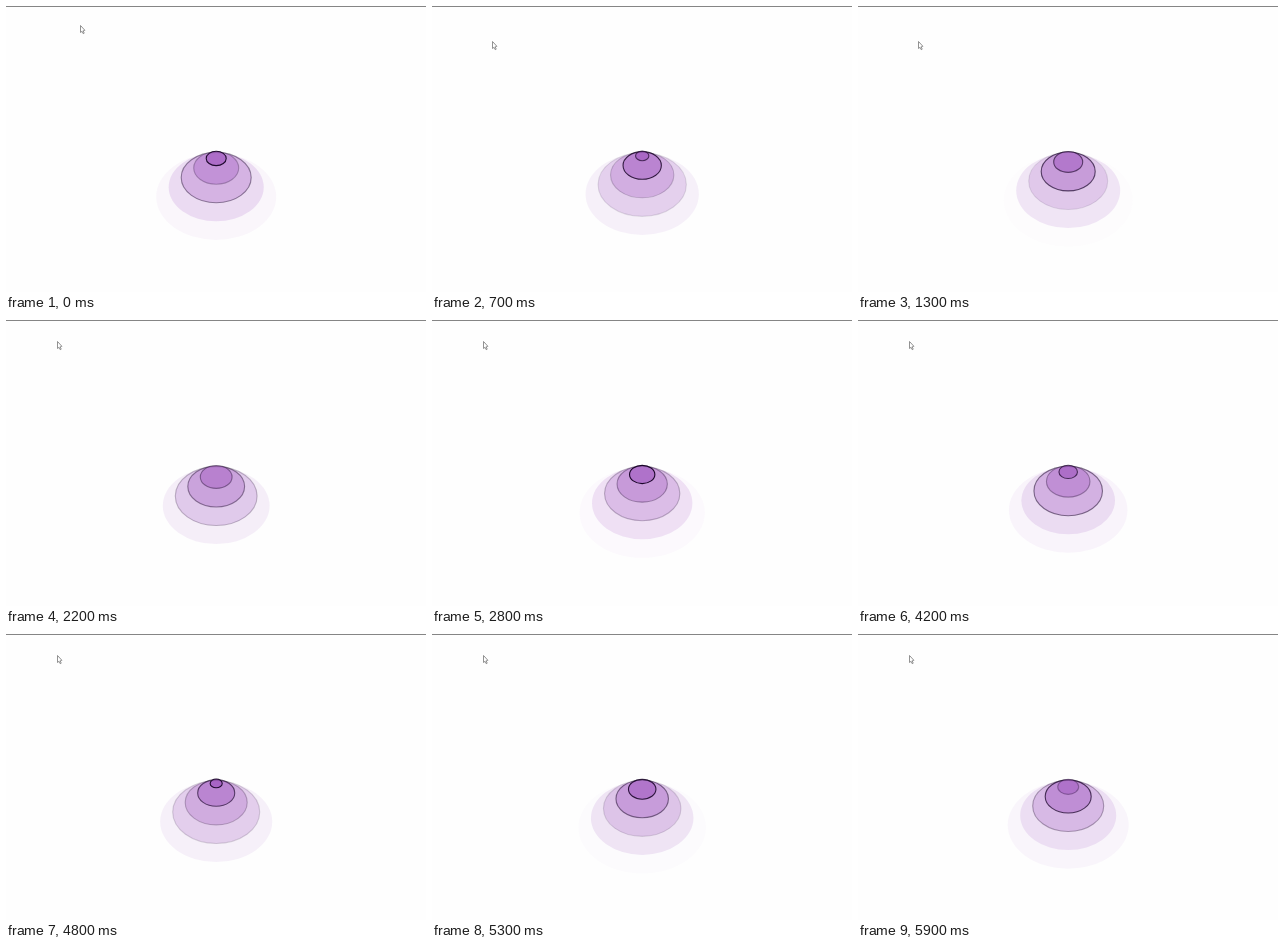
These frames come from a looping animation (420 px wide and 286 px high, 6000 ms). An HTML page with a canvas:

```html
<!DOCTYPE html>
<html lang="en">
<head>
<meta charset="utf-8">
<title>Purple ripples</title>
<style>
  html, body { margin: 0; width: 100%; height: 100%; overflow: hidden; background: #fefefe; }
  canvas { display: block; width: 420px; height: 286px; }
</style>
</head>
<body>
<canvas id="stage" width="420" height="286"></canvas>
<script>
const ctx = document.getElementById('stage').getContext('2d');
const LOOP = 6000, STEP = 100;
const GAP = 12.5, START = 10, MIN = 4.5, MAX = 66;

// Progress from 0 to 1 between two times
const ramp = (t, from, to) => Math.min(1, Math.max(0, (t - from) / (to - from)));

// Rings pulse: every 8 of them hold three strong beats
const strength = k => .72 + .38 * Math.cos(2 * Math.PI * (k - .3) * 3 / 8);

function ring(r, power) {
  const fill = (.4 + .17 * power) * (1 - r / MAX);
  const line = power * (1 - (r / 47) ** 2);
  ctx.beginPath();
  ctx.ellipse(210.2, 144.8 + r * .765, r, r * .72, 0, 0, Math.PI * 2);
  ctx.fillStyle = `rgba(150, 70, 185, ${fill})`;
  ctx.fill();
  if (line <= 0) return;
  ctx.strokeStyle = `rgba(25, 5, 40, ${Math.min(1, line)})`;
  ctx.lineWidth = 1.1;
  ctx.stroke();
}

function cursor(x, y) {
  ctx.save();
  ctx.translate(Math.round(x) + .5, Math.round(y) + .5);
  ctx.fillStyle = '#fff';
  ctx.strokeStyle = '#777';
  ctx.lineWidth = .8;
  const arrow = new Path2D('M0 0V7L1.6 5.8L2.7 8.2L3.7 7.7L2.7 5.3L4.4 4.8Z');
  ctx.fill(arrow);
  ctx.stroke(arrow);
  ctx.restore();
}

function draw(t) {
  ctx.fillStyle = '#fefefe';
  ctx.fillRect(0, 0, 420, 286);
  ctx.fillStyle = '#858585';
  ctx.fillRect(0, 0, 420, 1);

  // Oldest ring first, so that newer ones lie on top
  const reach = START + 17 * ramp(t, 0, 1300) + 71 * ramp(t, 1300, 5900);
  for (let k = Math.ceil((reach - MAX) / GAP); reach - k * GAP > MIN; k++) {
    ring(reach - k * GAP, strength(k));
  }

  const down = ramp(t, 0, 600), up = ramp(t, 1500, 2000);
  cursor(74 - 14 * down - 9 * up, 19 + 16 * down - 14 * up);
}

function tick() {
  const t = performance.now() % LOOP;
  draw(Math.floor(t / STEP) * STEP);
  requestAnimationFrame(tick);
}
tick();
</script>
</body>
</html>
```
